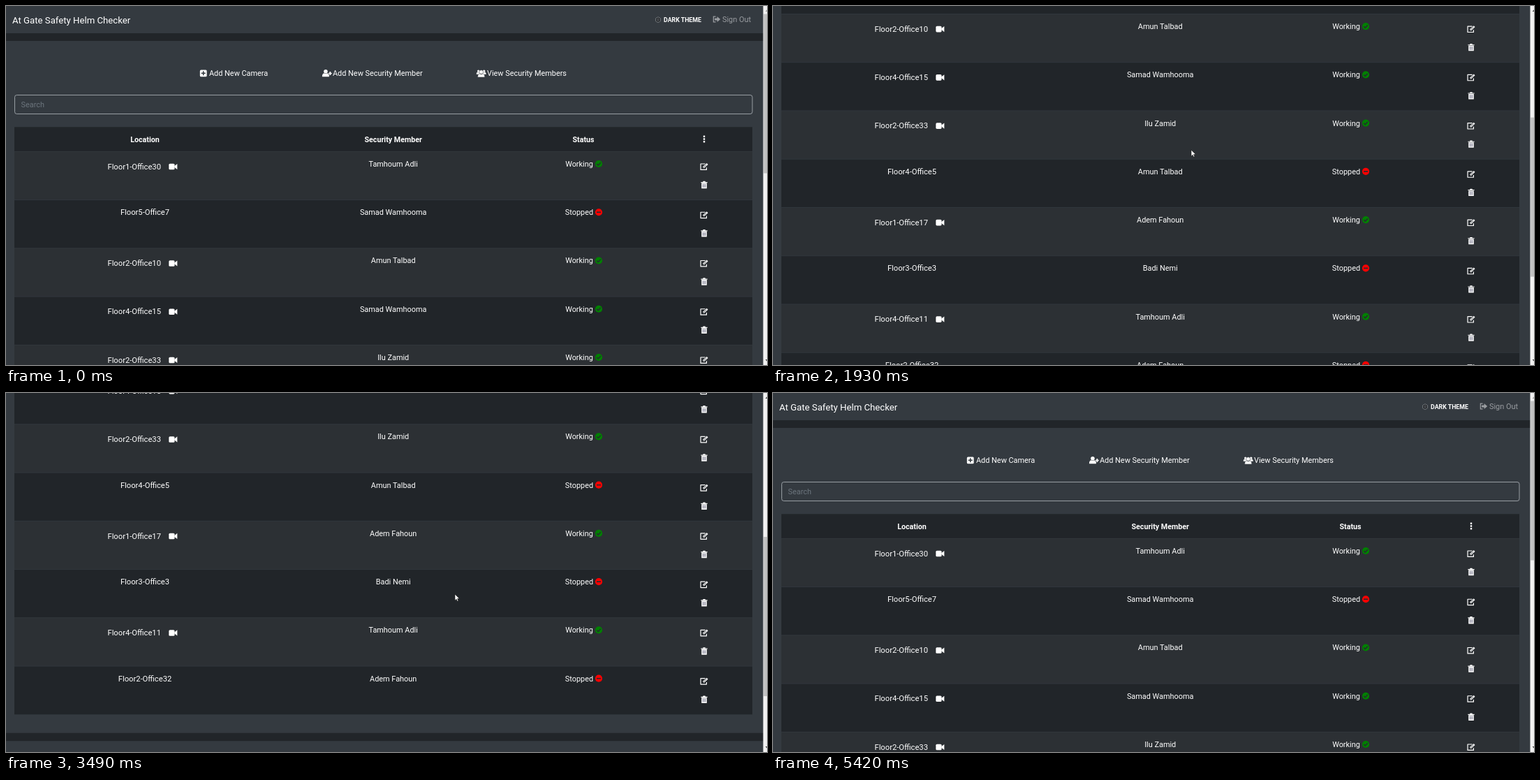
An HTML page that plays this animation: 1090 by 514 pixels, repeating every 6.04 s.

```html
<!DOCTYPE html>
<html lang="en">
<head>
<meta charset="utf-8">
<title>Camera list</title>
<style>
  html, body { margin: 0; width: 100%; height: 100%; overflow: hidden; background: #343a40; }
  svg { display: block; width: 100%; height: 100%; }
  text { font-family: Roboto, "Open Sans", sans-serif; }
</style>
</head>
<body>
<svg viewBox="0 0 1090 514">
  <defs>
    <g id="video" fill="#fff"><rect x="-6" y="-4.3" width="8.2" height="8.6" rx="1.6"/><path d="M2-1 6-4.1V4.1L2 1z"/></g>
    <g id="check"><circle r="5.1" fill="#008000"/><path d="M-2.8.1-.8 2 2.8-1.7" fill="none" stroke="#262b2f" stroke-width="1.5"/></g>
    <g id="minus"><circle r="5.1" fill="#f00"/><path d="M-3 0H3" stroke="#262b2f" stroke-width="1.6"/></g>
    <g id="edit" fill="none" stroke="#fff"><path d="M1.6-3.8H-5V4.6H3.4V1.4" stroke-width="1.2" stroke-linejoin="round"/><path d="M-1.2 1.5 4.6-3.8" stroke-width="2.6"/><path d="M-.9 1.2 3.3-2.7" stroke="#2c3034" stroke-width=".7"/></g>
    <g id="trash"><path d="M-4.6-3.9H-2L-1.4-5.2H1.4L2-3.9H4.6V-2.8H-4.6zM-3.8-2.4H3.8V5.2H-3.8z" fill="#fff"/><path d="M-1.8-1.2V3.8M0-1.2V3.8M1.8-1.2V3.8" stroke="#4c4c68" stroke-width=".7"/></g>
    <g id="plus"><rect x="-4.9" y="-4.9" width="9.8" height="9.8" rx="1.5" fill="#fff"/><path d="M-3 0H3M0-3V3" stroke="#343a40" stroke-width="1.6"/></g>
    <g id="person"><circle cy="-2.5" r="2.8"/><path d="M-5 4.9Q-5 .3-2.4 0 0 1.6 2.4 0 5 .3 5 4.9z"/></g>
    <g id="member" fill="#fff"><use href="#person" x="-1.8"/><path d="M2.2.2H7M4.6-2.2V2.6" stroke="#fff" stroke-width="1.7"/></g>
    <g id="users" fill="#fff"><use href="#person" transform="translate(-4 -1.6) scale(.6)"/><use href="#person" transform="translate(4 -1.6) scale(.6)"/><use href="#person" y=".7" stroke="#343a40" stroke-width=".5"/></g>
    <g id="info"><circle r="5.5" fill="#fff"/><path d="M0-3.7V-2M-1.4-.6H.2V2.8M-1.6 3.1H1.7" fill="none" stroke="#343a40" stroke-width="1.5"/></g>
    <g id="mail"><rect x="-6.7" y="-5" width="13.4" height="10.2" rx="1.3" fill="#fff"/><path d="M-6.7-2.9 0 1.5 6.7-2.9" fill="none" stroke="#343a40"/></g>
    <g id="link" fill="none" stroke="#fff"><path d="M.8-4H-5.8V5.1H3.3V1" stroke-width="1.3" stroke-linejoin="round"/><path d="M-1.4 1.2 4-4.2" stroke-width="1.8"/><path d="M1.7-6H6.4V-1.3z" fill="#fff" stroke="none"/></g>
    <g id="exit" fill="#999ca0"><path d="M-1.4-3.8H-4.6V3.8H-1.4" fill="none" stroke="#999ca0" stroke-width="1.3"/><path d="M-3-1.4H.6V-4L5.2 0 .6 4V1.4H-3z"/></g>
    <path id="dots" d="M0-5V5" stroke="#fff" stroke-width="2.4" stroke-dasharray="2.4 1.4"/>
    <g id="gear" fill="#25282b" stroke="#70757a"><path d="M0-4 3.5-2V2L0 4-3.5 2V-2z"/><circle r="1.4" stroke-width=".7"/></g>
  </defs>
  <g id="page"></g>
  <rect x="1084.5" width="5.5" height="514" fill="#f1f1f1"/>
  <rect id="thumb" x="1085.2" width="4.8" height="228" fill="#c1c1c1"/>
  <path id="up" d="M1087.5 8 1091 4.2V8z"/>
  <path id="down" d="M1087.5 506 1091 509.8V506z"/>
  <path id="cursor" d="M0 0V9.2L2.1 7.2 3.5 10.2 5 9.5 3.6 6.6H6.5z" fill="#fff" stroke="#111" stroke-width=".6"/>
</svg>
<script>
const LOOP = 6040, MAX_SCROLL = 597.5;
const BG = '#343a40', DARK = '#212529', LIGHT = '#2c3034';
const $ = id => document.getElementById(id);

const rect = (x, y, w, h, fill, extra = '') =>
  `<rect x="${x}" y="${y}" width="${w}" height="${h}" fill="${fill}" ${extra}/>`;
const icon = (id, x, y) => `<use href="#${id}" x="${x}" y="${y}"/>`;
// y is the middle of the capitals
const text = (str, x, y, { size = 10.9, anchor = 'start', weight = 400, fill = '#fff' } = {}) =>
  `<text x="${x}" y="${y + size * .36}" font-size="${size}" text-anchor="${anchor}" ` +
  `font-weight="${weight}" fill="${fill}">${str}</text>`;
const mid = (str, x, y, opts) => text(str, x, y, { anchor: 'middle', ...opts });

function header() {
  let out = rect(0, 0, 1085, 1112, BG) + rect(0, 39, 1085, 11, DARK);
  out += text('At Gate Safety Helm Checker', 9, 19.8, { size: 13.2 });
  out += icon('gear', 934, 19.7) + text('DARK THEME', 942, 19.8, { size: 8.8, weight: 700 });
  out += icon('exit', 1018, 19) + text('Sign Out', 1026, 19, { fill: '#999ca0' });
  const menu = [['plus', 291, 'Add New Camera'], ['member', 468, 'Add New Security Member'], ['users', 689, 'View Security Members']];
  for (const [name, x, label] of menu) out += icon(name, x - 8.3, 96.3) + text(label, x, 96.5);
  out += rect(12.5, 127.5, 1056.5, 27, BG, 'rx="3" stroke="#b0b6bb" stroke-width=".8"');
  return out + text('Search', 21.5, 141.5, { fill: '#6c757d' });
}

// place, member, working
const rows = [
  ['Floor1-Office30', 'Tamhoum Adli', true],
  ['Floor5-Office7', 'Samad Wamhooma', false],
  ['Floor2-Office10', 'Amun Talbad', true],
  ['Floor4-Office15', 'Samad Wamhooma', true],
  ['Floor2-Office33', 'Ilu Zamid', true],
  ['Floor4-Office5', 'Amun Talbad', false],
  ['Floor1-Office17', 'Adem Fahoun', true],
  ['Floor3-Office3', 'Badi Nemi', false],
  ['Floor4-Office11', 'Tamhoum Adli', true],
  ['Floor2-Office32', 'Adem Fahoun', false]
];

function table() {
  const head = { size: 10.7, weight: 700 }, pitch = 69.25, wide = { size: 11.2 };
  let out = rect(12, 173.3, 1057, 727.5, DARK);
  out += mid('Location', 199, 190.7, head) + mid('Security Member', 554.7, 190.7, head);
  out += mid('Status', 827, 190.7, head) + icon('dots', 1000, 190.5);
  rows.forEach(([place, member, working], i) => {
    const y = 208.3 + pitch * i, line = y + 17.7;
    if (i % 2 == 0) out += rect(12, y, 1057, pitch, LIGHT);
    out += rect(12, y - .4, 1057, .9, '#32383e');
    out += working ? mid(place, 183.7, y + 21.3, wide) + icon('video', 239.3, y + 21.7) : mid(place, 199, line, wide);
    out += mid(member, 554.7, line) + mid(working ? 'Working' : 'Stopped', 821, line);
    out += icon(working ? 'check' : 'minus', 849, line);
    out += icon('edit', 1000, y + 21.5) + icon('trash', 1000, y + 47.7);
  });
  return out;
}

function footer() {
  const top = 976.5, size = 12.1;
  // icon, its distance left of the column centre, title, lines
  const columns = [
    ['users', 34.5, 'Contribution', 'Fadhilan Orbasser', 'Tamhoud Arrouk', 'Orhdan Lisma'],
    ['info', 30.5, 'Supervisor', 'Prof. Wamhudan A. T. Orzabiaa'],
    ['mail', 16.5, 'Email', 'agshc@post.example'],
    ['link', 34, 'Useful Links', 'HTUDN', 'COE Department', 'Main Repository']
  ];
  let out = rect(0, 927.3, 1085, 11.5, DARK) + rect(0, 1071.5, 1085, 41, DARK);
  columns.forEach(([name, left, title, ...lines], i) => {
    const x = 234.7 + 204 * i;
    out += icon(name, x - left, top) + text(title, x - left + 9.2, top, { size });
    lines.forEach((line, j) => out += mid(line, x, top + 19 * (j + 1), { size }));
  });
  return out + mid('@2020 Copyrights - HTUDN-COE', 540.8, 1092.3, { size: 12.5 });
}

$('page').innerHTML = header() + table() + footer();

// each move: first update, last update, where it ends
const scrollMoves = [[910, 1710, 312.3], [1930, 2400, MAX_SCROLL], [3310, 4040, 132], [4180, 4420, 0]];
const cursorMoves = [[280, 910, 599, 206], [2850, 3080, 643, 288], [4870, 5420, 1040, 518]];

// the screen updates about every 80 ms, and each move eases out
function glide(first, last, t) {
  const n = Math.round((last - first) / 80);
  const i = Math.min(n, Math.floor((t - first) / (last - first) * n));
  return 1 - (1 - (i + .37) / (n + .37)) ** 1.41;
}

function follow(moves, from, t) {
  for (const [first, last, ...to] of moves) {
    if (t < first) break;
    const p = glide(first, last, t);
    from = from.map((v, j) => v + (to[j] - v) * p);
  }
  return from;
}

function draw(t) {
  const [scroll] = follow(scrollMoves, [0], t);
  const [x, y] = follow(cursorMoves, [1022, 516], t);
  const arrow = active => active ? '#505050' : '#a3a3a3';
  $('page').setAttribute('transform', `translate(0 ${-scroll})`);
  $('thumb').setAttribute('y', 11.5 + scroll * .4416);
  $('up').setAttribute('fill', arrow(scroll > 0));
  $('down').setAttribute('fill', arrow(scroll < MAX_SCROLL));
  $('cursor').setAttribute('transform', `translate(${x} ${y})`);
}

const start = performance.now();
function tick() {
  draw((performance.now() - start) % LOOP);
  requestAnimationFrame(tick);
}
tick();
</script>
</body>
</html>
```
